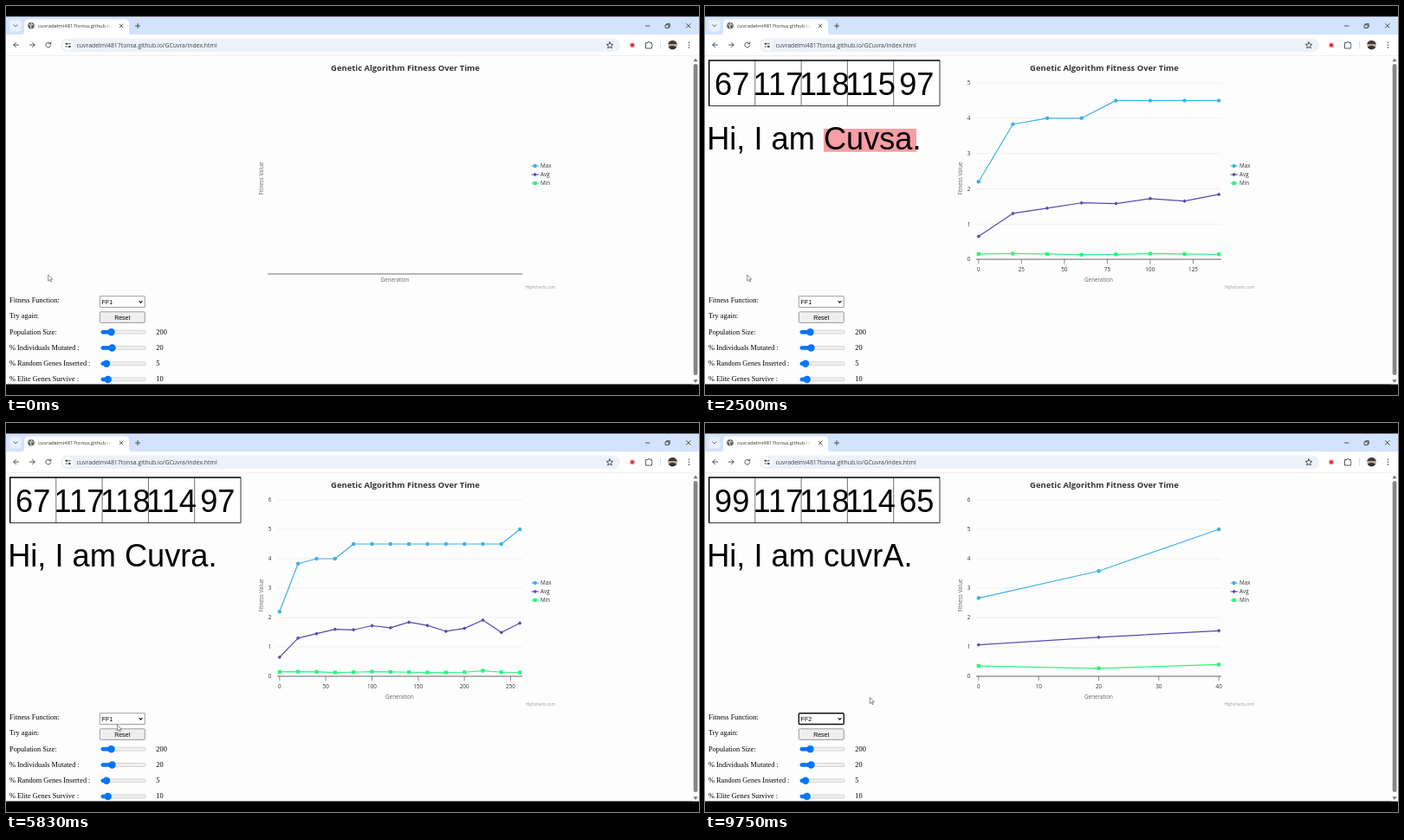
Animation, 800 px wide and 450 px high, one loop 9830 ms. Source, as an HTML page:

```html
<!DOCTYPE html>
<html lang="en">
<head>
<meta charset="utf-8">
<title>Genetic Algorithm Fitness Over Time</title>
<style>
html, body { margin: 0; width: 100%; height: 100%; overflow: hidden; background: #000; }
svg { display: block; width: 800px; height: 450px; }
text { font-family: "Open Sans", sans-serif; white-space: pre; }
.ui { fill: none; stroke: #3c4043; stroke-width: .9; stroke-linecap: round; stroke-linejoin: round; }
.big text { font: 36.2px "Liberation Sans", Arial, sans-serif; }
.form text { font: 8.33px "Liberation Serif", serif; }
.form .ctl { font: 6.94px "Liberation Sans", sans-serif; }
.chart text { font-size: 6.3px; fill: #333; }
.chart .axis { fill: #666; }
.chart .title { font-size: 9.42px; font-weight: 700; }
.chart .credit { font-size: 4.7px; fill: #999; }
</style>
</head>
<body>
<svg viewBox="0 0 800 450">
  <defs>
    <clipPath id="page"><rect y="57" width="800" height="380.5"/></clipPath>
    <clipPath id="reveal"><rect id="wipe" y="80" height="222"/></clipPath>
    <clipPath id="face"><circle cx="769.5" cy="45" r="5.3"/></clipPath>
    <linearGradient id="fade"><stop offset="0" stop-color="#fff" stop-opacity="0"/><stop offset="1" stop-color="#fff"/></linearGradient>
  </defs>

  <rect y="12.5" width="800" height="425" fill="#fdfdfd"/>
  <rect y="12.5" width="800" height="21" fill="#d3e3fd"/>
  <rect y="33" width="800" height="24.2" fill="#fff"/>
  <path d="M0 57.4H800" stroke="#dfe3e8" stroke-width=".6"/>

  <!-- tab strip -->
  <rect x="4" y="16" width="13.5" height="13.5" rx="4" fill="#e9f1fe"/>
  <path class="ui" d="M9 21.8l2 2 2-2"/>
  <path d="M17 33.5q4 0 4-4V20q0-4.500 4.500-4.500h112q4.500 0 4.500 4.500v9.500q0 4 4 4z" fill="#fff"/>
  <circle cx="29" cy="22.8" r="3.800" fill="#5f6368"/>
  <path d="M26.500 21.500l2.500 1-.5 2 1 1.500M29.500 19.500l-.5 1.500 2.500 1" fill="none" stroke="#fff" stroke-width=".9"/>
  <text x="37" y="25" font-size="5.9" fill="#30343a">cuvradelmi4817tonsa.github.io</text>
  <rect x="112" y="18" width="11" height="11" fill="url(#fade)"/>
  <rect x="123" y="18" width="5" height="11" fill="#fff"/>
  <path class="ui" d="M131.300 21l3.800 3.800m0-3.800l-3.800 3.800M149.500 23h5.200m-2.600-2.600v5.200"/>
  <path class="ui" d="M738.500 23h4.500M761.500 21.800h3.600v3.600h-3.600zM762.700 21.600v-1h3.600v3.600h-1M785.500 20.500l4.600 4.600m0-4.600l-4.600 4.600"/>

  <!-- toolbar -->
  <path class="ui" d="M14.500 45H8.800m2.700-2.700L8.800 45l2.700 2.700M27.500 45h5.700m-2.700-2.700l2.700 2.700-2.700 2.700"/>
  <path class="ui" d="M51.300 43.500a2.900 2.900 0 1 0 .4 2.200M51.800 41.800v2h-2"/>
  <rect x="63" y="37.500" width="646" height="15.800" rx="7.900" fill="#edf2fa"/>
  <circle cx="71.500" cy="45.300" r="5.800" fill="#fff"/>
  <path class="ui" d="M69 43.700h1.500m2 0h2M69 47h1.500m2 0h2"/>
  <circle class="ui" cx="70" cy="43.700" r=".9"/><circle class="ui" cx="73" cy="47" r=".9"/>
  <text x="81.500" y="47.800" font-size="6.9" fill="#3c4043">cuvradelmi4817tonsa.github.io/GCuvra/index.html</text>
  <path class="ui" d="M697 41.700l1.100 2.400 2.600.3-2 1.800.6 2.600-2.300-1.300-2.300 1.300.6-2.600-2-1.800 2.600-.3z"/>
  <circle cx="723" cy="45.200" r="3.200" fill="#f7b9bc"/><circle cx="723" cy="45.200" r="2" fill="#e5262e"/>
  <path class="ui" d="M738.800 42.500h2.200a1.200 1.200 0 0 1 2.400 0h2v2.200a1.200 1.200 0 0 1 0 2.200v2.100h-6.600z"/>
  <path d="M755.500 41v8.500" stroke="#c7d7f2" stroke-width=".8"/>
  <g clip-path="url(#face)"><rect x="763" y="39" width="13" height="13" fill="#b9a796"/><rect x="763" y="39" width="13" height="5" fill="#433b38"/><path d="M764 51v-3q5-4 11 0v3z" fill="#342f32"/></g>
  <g fill="#3c4043"><circle cx="788.500" cy="42.300" r=".8"/><circle cx="788.500" cy="45.200" r=".8"/><circle cx="788.500" cy="48.100" r=".8"/></g>

  <g clip-path="url(#page)">
    <rect x="792" y="57.700" width="8" height="380" fill="#fafafa"/>
    <rect x="793.700" y="67" width="4.700" height="360" rx="2.300" fill="#858585"/>
    <path d="M796 60.500l2.600 3.800h-5.200zM796 436l2.600-3.800h-5.200z" fill="#777"/>

    <g id="genes" class="big"></g>
    <g class="chart">
      <text class="title" x="461" y="75" text-anchor="middle">Genetic Algorithm Fitness Over Time</text>
      <text class="axis" transform="translate(297 199.500) rotate(-90)" text-anchor="middle">Fitness Value</text>
      <text class="credit" x="634" y="326.500" text-anchor="end">Highcharts.com</text>
      <g id="legend"></g>
      <g id="axes"></g>
      <g id="lines" clip-path="url(#reveal)"></g>
    </g>
    <g class="form">
      <g id="rows"></g>
      <rect id="box" x="108.300" y="335.700" width="52" height="12.800" fill="#fff"/>
      <text class="ctl" id="fn" x="110.800" y="344.600"></text>
      <path d="M153.700 341.200l1.900 1.900 1.900-1.900" fill="none" stroke="#111" stroke-width="1.100"/>
      <rect x="108.300" y="353.800" width="52" height="12.600" rx="1.300" fill="#efefef" stroke="#767676" stroke-width=".7"/>
      <text class="ctl" x="134.300" y="362.600" text-anchor="middle">Reset</text>
    </g>
    <path id="cursor" d="M0 0v7l1.700-1.400 1.100 2.500 1.200-.5-1.100-2.400h2.200z" fill="#fff" stroke="#444" stroke-width=".6"/>
  </g>
</svg>
<script>
const LOOP = 9830, STEP = 306, WIPE = 750, CLEAR = 8650;
const RIGHT = 596, TOP = 89, BASE = 293;
const $ = id => document.getElementById(id);

const RUNS = [
  { start: 120, fn: 'FF1',
    names: { 0: 'Cnvha', 1: 'Csvsa', 2: 'Ctvsa', 4: 'Cuvsa', 13: 'Cuvra' }, marked: { 1: [1, 3] },
    max: [2.2, 3.83, 4, 4, ...Array(9).fill(4.5), 5],
    avg: [.65, 1.3, 1.45, 1.6, 1.58, 1.72, 1.65, 1.84, 1.73, 1.53, 1.63, 1.91, 1.49, 1.81],
    min: [.15, .16, .15, .13, .14, .16, .15, .14, .13, .13, .14, .19, .14, .13] },
  { start: 8900, fn: 'FF2',
    names: { 0: 'AuvSc', 1: 'euvrD', 2: 'cuvrA' }, marked: {},
    max: [2.66, 3.58, 5], avg: [1.07, 1.33, 1.55], min: [.35, .27, .4] }
];

const SERIES = [
  ['max', 'Max', '#3fb1e8', (x, y) => `<circle cx="${x}" cy="${y}" r="2.200"/>`],
  ['avg', 'Avg', '#5a48b0', (x, y) => `<path d="M${x} ${y - 2.2}l2.200 2.200-2.200 2.200-2.200-2.200z"/>`],
  ['min', 'Min', '#2bf57c', (x, y) => `<rect x="${x - 2.1}" y="${y - 2.1}" width="4.200" height="4.200"/>`]
];

// time, x, y of the pointer tip
const PATH = [
  [0, 48.7, 311], [4600, 48.7, 311], [5000, 84, 336], [5700, 128, 348], [6600, 134, 368],
  [7420, 130.7, 375], [8000, 134, 340], [8450, 134, 344], [8920, 177.3, 321], [9750, 190.3, 317.5]
];

const label = (x, y, s, anchor, cls = '') =>
  `<text class="${cls}" x="${x}" y="${y}" text-anchor="${anchor}">${s}</text>`;
const line = (x1, y1, x2, y2, color, w = .55) =>
  `<path d="M${x1} ${y1}L${x2} ${y2}" stroke="${color}" stroke-width="${w}"/>`;

function niceStep(raw) {
  const mag = 10 ** Math.floor(Math.log10(raw)), m = [1, 2, 2.5, 5, 10];
  const i = m.findIndex((v, k) => k === 4 || raw / mag <= (v + m[k + 1]) / 2);
  return m[i] * mag;
}

function emptyChart() {
  $('axes').innerHTML = line(302, 310, RIGHT, 310, '#333', .7) + label(449, 318.7, 'Generation', 'middle', 'axis');
  $('lines').innerHTML = '';
}

function drawChart(run, n) {
  const peak = run.max[n] * 1.05, stepY = niceStep(peak * .19);
  const top = Math.ceil(peak / stepY) * stepY, left = stepY < 1 ? 318 : 313;
  const last = n * 20, pad = (RIGHT - left) * .01, mid = (left + RIGHT) / 2;
  const px = g => last ? left + pad + g / last * (RIGHT - left - 2 * pad) : mid;
  const py = v => BASE - v / top * (BASE - TOP);

  let out = '';
  for (let v = 0; v <= top + .01; v += stepY) {
    out += line(left, py(v), RIGHT, py(v), '#e6e6e6') + label(left - 6.7, py(v) + 2.3, v, 'end');
  }
  out += line(left, BASE, RIGHT, BASE, '#333', .7);
  let stepX = last ? niceStep(last * 1.02 * .1845) : 1;
  if (stepX % 1) stepX = 5;
  for (let g = 0; g <= last; g += stepX) {
    out += line(px(g), BASE, px(g), BASE + 5.2, '#333') + label(px(g), 307.3, g, 'middle');
  }
  $('axes').innerHTML = out + label(mid, 318.7, 'Generation', 'middle', 'axis');

  $('lines').innerHTML = SERIES.map(([key, , color, mark]) => {
    const pts = run[key].slice(0, n + 1).map((v, i) => [px(i * 20), py(v)]);
    return `<polyline points="${pts.join(' ')}" fill="none" stroke="${color}" stroke-width="1.200" stroke-linejoin="round"/>` +
      `<g fill="${color}">${pts.map(p => mark(...p)).join('')}</g>`;
  }).join('');
  $('wipe').setAttribute('x', left - 2);
  return RIGHT - left;
}

function drawGenes(run, n) {
  const key = Math.max(...Object.keys(run.names).filter(k => k <= n));
  const name = run.names[key], marked = run.marked[n] || [], w = 53.3;
  const glow = 1 - Math.exp(-7 * (1 - run.max[n] / 5));
  let out = '<rect x="4.500" y="62.700" width="266.500" height="52.800" fill="#fff"/>';
  [...name].forEach((c, i) => {
    const x = 4.5 + i * w;
    if (marked.includes(i)) out += `<rect x="${x}" y="62.700" width="${w}" height="52.800" fill="#f2707c"/>`;
    if (i) out += line(x, 62.700, x, 115.5, '#333', .7);
  });
  out += '<path d="M271 62.700V115.500H4.500" fill="none" stroke="#222" stroke-width=".9"/>' +
    '<path d="M4.700 115.500V62.900H271" fill="none" stroke="#000" stroke-width="1.500"/>';
  [...name].forEach((c, i) => out += label(4.5 + (i + .5) * w, 102.6, c.charCodeAt(0), 'middle'));
  if (glow > 0) out += `<rect x="137" y="142" width="107" height="26.700" fill="#f5404f" opacity="${glow}"/>`;
  $('genes').innerHTML = out + label(2.2, 166.3, `Hi, I am ${name}.`, 'start');
}

function buildStatic() {
  $('legend').innerHTML = SERIES.map(([, name, color, mark], i) => {
    const y = 185 + i * 10;
    return line(606.5, y, 615, y, color, 1.2) + `<g fill="${color}">${mark(610.7, y)}</g>` + label(617, y + 2.3, name, 'start');
  }).join('');
  const rows = [['Fitness Function:'], ['Try again:'], ['Population Size:', 200, 121.5], ['% Individuals Mutated :', 20, 122.5],
    ['% Random Genes Inserted :', 5, 116], ['% Elite Genes Survive :', 10, 117.7]];
  $('rows').innerHTML = rows.map(([name, value, knob], i) => {
    const y = 340.6 + i * 18.25;
    let s = label(4, y + 2.4, name, 'start');
    if (value) s += label(173.3, y + 2.4, value, 'start') +
      `<rect x="109.800" y="${y - 1.9}" width="51.500" height="4" rx="2" fill="#efefef" stroke="#b2b2b2" stroke-width=".5"/>` +
      `<rect x="109.600" y="${y - 2.1}" width="${knob - 109.6}" height="4.400" rx="2.200" fill="#0075ff"/>` +
      `<circle cx="${knob}" cy="${y + .1}" r="4.200" fill="#0075ff"/>`;
    return s;
  }).join('');
}

function setFunction(name) {
  const focus = name === 'FF2', box = $('box');
  $('fn').textContent = name;
  box.setAttribute('stroke', focus ? '#101010' : '#767676');
  box.setAttribute('stroke-width', focus ? 1.4 : .7);
  box.setAttribute('rx', focus ? 1.2 : .3);
}

function moveCursor(t) {
  const i = Math.max(1, PATH.findIndex(p => p[0] > t)), j = t >= PATH.at(-1)[0] ? PATH.length - 1 : i;
  const a = PATH[j - 1], b = PATH[j], u = Math.min(1, (t - a[0]) / (b[0] - a[0]));
  const e = u * u * (3 - 2 * u);
  $('cursor').setAttribute('transform', `translate(${a[1] + (b[1] - a[1]) * e} ${a[2] + (b[2] - a[2]) * e})`);
}

let shown = '', width = 0;
function frame(now) {
  const t = now % LOOP, run = RUNS[t < CLEAR ? 0 : 1];
  const n = Math.min(Math.floor((t - run.start) / STEP), run.max.length - 1);
  const key = run.fn + Math.max(n, -1);
  if (key !== shown) {
    shown = key;
    setFunction(run.fn);
    if (n < 0) {
      emptyChart();
      if (run === RUNS[0]) $('genes').innerHTML = '';
      else drawGenes(RUNS[0], 13);
    } else {
      width = drawChart(run, n);
      drawGenes(run, n);
    }
  }
  const u = Math.max(0, Math.min(1, (t - run.start) / WIPE));
  $('wipe').setAttribute('width', (width + 4) * (1 - Math.cos(Math.PI * u)) / 2);
  moveCursor(t);
  requestAnimationFrame(frame);
}

buildStatic();
requestAnimationFrame(frame);
</script>
</body>
</html>
```
